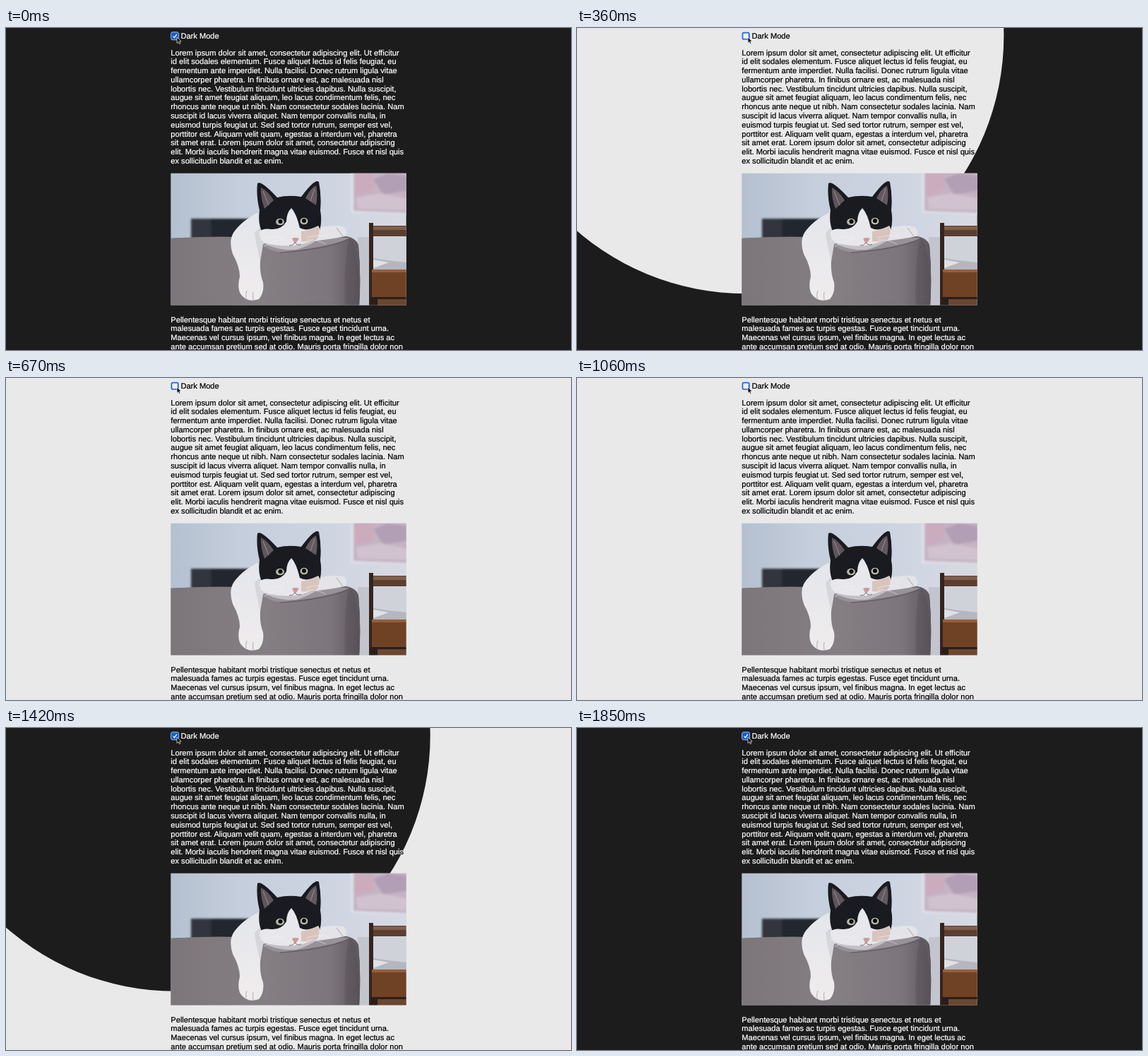
An HTML page for the animation above (1880 ms loop, 800 by 456 pixels).

```html
<!DOCTYPE html>
<html lang="en">
<head>
<meta charset="utf-8">
<title>Dark Mode</title>
<style>
  html, body { margin: 0; height: 100%; overflow: hidden; background: #1c1c1c; }
  svg { display: block; }
  text { font: 11.11px "Liberation Sans", Arial, sans-serif; text-rendering: geometricPrecision; }
  .page { stroke-width: .22px; }
</style>
</head>
<body>
<svg id="stage" width="800" height="456" viewBox="0 0 800 456">
  <defs>
    <g id="copy"></g>
    <clipPath id="reveal"><circle id="hole" cx="239" cy="11"/></clipPath>
    <clipPath id="frame"><rect x="233.3" y="205.8" width="333.4" height="186.7"/></clipPath>
    <linearGradient id="wall">
      <stop offset="0" stop-color="#b4c0d0"/>
      <stop offset=".3" stop-color="#c5cedc"/>
      <stop offset=".75" stop-color="#d0d6e2"/>
      <stop offset="1" stop-color="#d8dae2"/>
    </linearGradient>
    <linearGradient id="sofa">
      <stop offset="0" stop-color="#7c757a"/>
      <stop offset=".5" stop-color="#857e83"/>
      <stop offset=".85" stop-color="#7c757b"/>
      <stop offset="1" stop-color="#5d565c"/>
    </linearGradient>
    <linearGradient id="shade" x2="0" y2="1">
      <stop offset="0" stop-color="#a8a1a8" stop-opacity=".5"/>
      <stop offset=".25" stop-color="#8a828a" stop-opacity=".15"/>
      <stop offset="1" stop-color="#3c363c" stop-opacity=".2"/>
    </linearGradient>
    <linearGradient id="fur" x2="0" y2="1">
      <stop offset="0" stop-color="#e4e6ec"/>
      <stop offset="1" stop-color="#efecec"/>
    </linearGradient>
    <filter id="soft"><feGaussianBlur stdDeviation="1.6"/></filter>
    <filter id="edge"><feGaussianBlur stdDeviation=".5"/></filter>
  </defs>

  <g id="dark">
    <rect width="800" height="456" fill="#1c1c1c"/>
    <use class="page" href="#copy" fill="#fff" stroke="#fff"/>
    <rect x="233.6" y="5.8" width="11" height="11" rx="2.4" fill="#165fca" stroke="#a9c8f5" stroke-width=".9"/>
    <path d="M236.6 11.6l1.9 2 3.3-4.8" fill="none" stroke="#fff" stroke-width="1.3"/>
  </g>
  <g id="light">
    <rect width="800" height="456" fill="#e9e9e9"/>
    <use class="page" href="#copy" fill="#000" stroke="#000"/>
    <rect x="234.4" y="6.6" width="9.4" height="9.4" rx="2" fill="#fff" stroke="#1767dc" stroke-width="1.7"/>
    <rect x="235.7" y="7.9" width="6.8" height="6.8" rx="1" fill="#f5f5f5" stroke="#aab4c2" stroke-width=".6"/>
  </g>

  <g id="photo" clip-path="url(#frame)">
    <rect x="233" y="205" width="334" height="188" fill="url(#wall)"/>
    <!-- background: picture, screen -->
    <g filter="url(#soft)">
      <path d="M488 200h90v64l-90-2z" fill="#dfe0e8"/>
      <path d="M492 200h80v62l-80-3z" fill="#c5b3c4"/>
      <path d="M494 206h26v24l-26 8z" fill="#cbacbd"/>
      <path d="M520 214l20-8 30 4v20l-36 6z" fill="#b39fb5"/>
      <path d="M496 240l34-6 40 8v16l-72-2z" fill="#d0c2ce"/>
      <path d="M262 270h104v34H262z" fill="#24272e"/>
      <path d="M262 270h28v30h-28z" fill="#30343c"/>
    </g>
    <!-- chair -->
    <g filter="url(#edge)">
      <path d="M498 296h20v100h-20z" fill="#c3c5ce"/>
      <path d="M520 296h47v48h-47z" fill="#d0d2da"/>
      <path d="M520 326l20 3 27 3v11h-47z" fill="#b4b6c0"/>
      <path d="M520 328l22 4-22 8z" fill="#e0e1e7"/>
      <path d="M515 280h52v15h-52z" fill="#5a3f31"/>
      <path d="M520 281h47v5h-47z" fill="#80604c"/>
      <path d="M514 276h6v117h-6z" fill="#35251f"/>
      <path d="M518 342h49v41h-49z" fill="#704225"/>
      <path d="M518 342h49v4h-49z" fill="#965f3b"/>
      <path d="M516 381h51v12h-51z" fill="#2b1d19"/>
      <path d="M526 384h41v9h-41z" fill="#6b4630"/>
    </g>
    <!-- sofa -->
    <g filter="url(#edge)">
      <path id="couch" d="M230 298Q300 294 350 297L470 294Q495 294 499 308Q503 350 500 396H230z" fill="url(#sofa)"/>
      <use href="#couch" style="fill:url(#shade)"/>
      <path d="M364 306Q430 296 486 297Q472 307 395 317Q372 318 364 306z" fill="#989197"/>
      <path d="M486 297Q500 300 500 396H480Q478 330 486 297z" fill="#4e474e" opacity=".3"/>
      <path d="M388 318Q450 314 484 300" stroke="#5b545a" fill="none"/>
    </g>
    <!-- cat -->
    <g filter="url(#edge)">
      <path d="M436 284Q462 278 478 281Q486 289 480 295Q462 299 432 302z" fill="#e3e3e8"/>
      <path d="M468 283l9 12" stroke="#aaa5ad" fill="none"/>
      <path d="M360 260Q334 272 322 290Q315 302 321 320Q331 338 331 352Q326 372 335 380Q344 389 358 384Q366 375 364 360Q359 348 360 330L364 306L378 300z" fill="url(#fur)"/>
      <path d="M352 290Q354 306 360 330L364 306L380 302L362 280z" fill="#c4c5ce" opacity=".5"/>
      <path d="M340 383q-1-7 1-11M350 385q-1-7 0-11" stroke="#b2acb1" fill="none"/>
      <path d="M356 220Q361 215 384 240Q400 236 418 239Q438 212 443 218Q447 238 445 258Q449 280 440 296Q424 306 406 311Q376 308 364 292Q356 278 359 258Q354 238 356 220z" fill="#191b20"/>
      <path d="M361 226Q370 230 379 244L366 256Q360 240 361 226z" fill="#5f555b"/>
      <path d="M439 223Q431 227 424 241L439 251Q442 236 439 223z" fill="#635960"/>
      <path d="M364 231l8 20M437 228l-6 17" stroke="#9b8e92" fill="none"/>
      <path d="M404 255Q397 262 397 274Q390 286 376 285Q364 283 359 288Q357 299 370 307Q386 314 406 314Q428 310 443 298Q447 286 442 280Q426 289 416 283Q411 262 404 255z" fill="#e8e7eb"/>
      <path d="M366 304Q386 310 410 308Q430 305 443 295Q436 307 410 314Q382 315 366 304z" fill="#c3bfc5"/>
      <path d="M418 288q14-2 24-7q4 11-2 17q-12 6-22 4z" fill="#d8c4bd"/>
      <path d="M405 298q5-2 10 0l-4 6h-3z" fill="#c99b9b"/>
      <path d="M409 304q-3 5-8 4m8-4q4 5 9 2" stroke="#786c71" fill="none"/>
      <g fill="#b5b7a9" stroke="#0b0c0f">
        <ellipse cx="388" cy="274.5" rx="6.4" ry="5.4"/>
        <ellipse cx="422" cy="273.5" rx="6" ry="5.4"/>
      </g>
      <circle cx="388.5" cy="274" r="3" fill="#08090b"/>
      <circle cx="422" cy="273" r="3" fill="#08090b"/>
      <path d="M392 296q-18-2-34 5m35-2q-18 3-28 11m60-13q18-5 31-2m-30 5q16 0 27 6" stroke="#f4f4f8" stroke-width=".5" fill="none"/>
    </g>
  </g>
  <path d="M242 13v8.4l2-1.8 1.3 3 1.5-.7-1.3-2.9h2.6z" fill="#000" stroke="#fff" stroke-width=".7"/>
</svg>
<script>
const LOOP = 1880, SWEEP = 308, TO_LIGHT = 205, TO_DARK = 1266;
const FULL = Math.hypot(800 - 239, 456 - 11); // reaches the farthest corner
const $ = id => document.getElementById(id);

const intro = `Lorem ipsum dolor sit amet, consectetur adipiscing elit. Ut efficitur
id elit sodales elementum. Fusce aliquet lectus id felis feugiat, eu
fermentum ante imperdiet. Nulla facilisi. Donec rutrum ligula vitae
ullamcorper pharetra. In finibus ornare est, ac malesuada nisl
lobortis nec. Vestibulum tincidunt ultricies dapibus. Nulla suscipit,
augue sit amet feugiat aliquam, leo lacus condimentum felis, nec
rhoncus ante neque ut nibh. Nam consectetur sodales lacinia. Nam
suscipit id lacus viverra aliquet. Nam tempor convallis nulla, in
euismod turpis feugiat ut. Sed sed tortor rutrum, semper est vel,
porttitor est. Aliquam velit quam, egestas a interdum vel, pharetra
sit amet erat. Lorem ipsum dolor sit amet, consectetur adipiscing
elit. Morbi iaculis hendrerit magna vitae euismod. Fusce et nisl quis
ex sollicitudin blandit et ac enim.`;
const more = `Pellentesque habitant morbi tristique senectus et netus et
malesuada fames ac turpis egestas. Fusce eget tincidunt urna.
Maecenas vel cursus ipsum, vel finibus magna. In eget lectus ac
ante accumsan pretium sed at odio. Mauris porta fringilla dolor non`;

const lines = (text, x, y) => text.split("\n")
  .map((line, i) => `<text x="${x}" y="${y + i * 12.78}">${line}</text>`).join("");
$("copy").innerHTML = lines("Dark Mode", 247.4, 15) + lines(intro, 233.3, 38.5) + lines(more, 233.3, 416.6);

let topLayer;
function raise(layer) {
  if (layer === topLayer) return;
  topLayer?.removeAttribute("clip-path");
  layer.setAttribute("clip-path", "url(#reveal)");
  $("stage").insertBefore(layer, $("photo"));
  topLayer = layer;
}

function draw(now) {
  const t = now % LOOP;
  const light = t >= TO_LIGHT && t < TO_DARK;
  const start = light ? TO_LIGHT : t < TO_LIGHT ? TO_DARK - LOOP : TO_DARK;
  const p = Math.min(1, (t - start) / SWEEP);
  raise($(light ? "light" : "dark"));
  $("hole").setAttribute("r", FULL * (1 - Math.cos(Math.PI * p)) / 2);
}

const began = performance.now();
function tick() {
  draw(performance.now() - began);
  requestAnimationFrame(tick);
}
tick();
</script>
</body>
</html>
```
